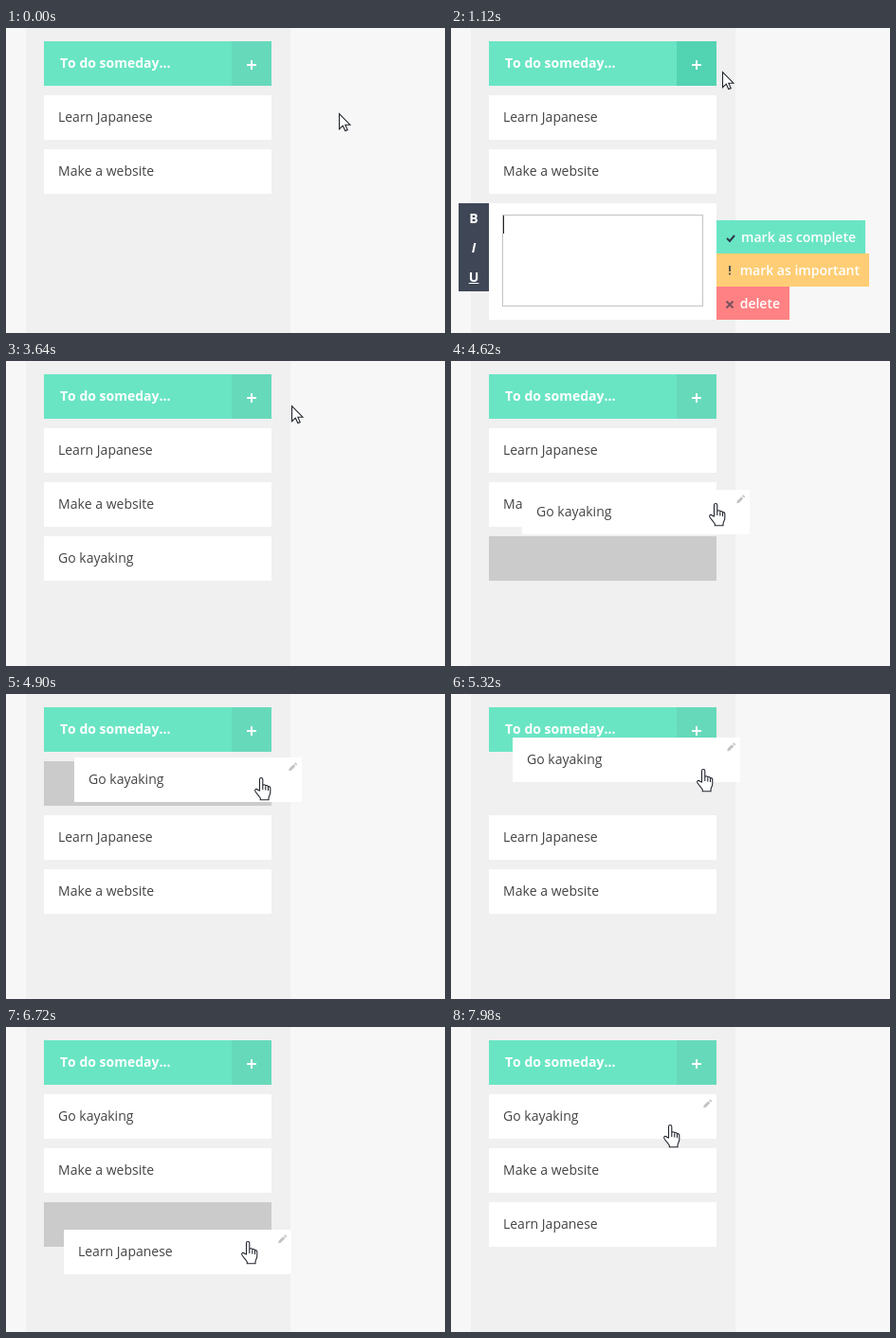
Recreate the animation shown at these times as an HTML page. Size 463 by 322 pixels, loop 8 s.

```html
<!DOCTYPE html>
<html lang="en">
<head>
<meta charset="utf-8">
<title>To-do list</title>
<style>
  html, body { margin: 0; width: 100%; height: 100%; overflow: hidden; }
  body { position: relative; background: #f7f7f7; color: #444; font: 14px/19px "Open Sans", sans-serif; font-kerning: none; cursor: none; }
  div, svg { position: absolute; box-sizing: border-box; }
  svg { overflow: visible; }
  .column { left: 21px; top: 0; width: 279px; height: 322px; background: #f0f0f0; }
  .header, .item, .slot { left: 0; top: 0; width: 240px; height: 47px; white-space: pre; }
  .header { left: 40px; top: 14px; padding: 13px 17px; background: #6ae5c4; color: #fff; font-weight: 700; }
  .add { right: 0; top: 0; width: 42px; height: 47px; background: #67d9bb; }
  .add.hot { background: #52d3b2; }
  .item { padding: 13px 15px; background: #fff; }
  .item.lifted { z-index: 2; }
  .item svg { left: 226px; top: 5px; fill: #c4c4c4; }
  .slot { left: 40px; background: #cbcbcb; }
  .form { left: 40px; top: 185px; width: 240px; height: 123px; background: #fff; }
  .field { left: 14px; top: 12px; width: 212px; height: 97px; border: 1px solid #c3c3c3; }
  .typed { left: 15px; top: 13px; height: 19px; white-space: pre; border-right: 1px solid #222; }
  .tools { left: -32px; top: 0; width: 32px; height: 93px; background: #3f4757; color: #fff;
           font-weight: 700; line-height: 31px; text-align: center; }
  .tools > * { display: block; }
  .action { left: 240px; height: 35px; padding: 8px 10px; color: #fff; font-weight: 600; text-align: right; white-space: pre; }
  .action svg { left: 10px; top: 14px; fill: none; stroke: #2e3b4b; stroke-width: 2; }
  .done { top: 18px; width: 157px; background: #6ae5c4; }
  .urgent { top: 53px; width: 161px; background: #ffcd75; }
  .remove { top: 88px; width: 77px; background: #ff8183; }
  .pointer { left: 0; top: 0; z-index: 3; fill: #fff; stroke: #20242c; stroke-width: 1.1; }
</style>
</head>
<body>
<div class="column"></div>
<div class="header">To do someday...<div class="add"><svg width="42" height="47"><path d="M16 25h10M21 20v10" stroke="#fff" stroke-width="2"/></svg></div></div>
<div class="slot"></div>
<div class="item">Learn Japanese</div>
<div class="item">Make a website</div>
<div class="item">Go kayaking</div>
<div class="form">
  <div class="field"></div>
  <div class="typed"></div>
  <div class="tools"><b>B</b><i>I</i><u>U</u></div>
  <div class="action done"><svg width="10" height="10"><path d="M1 5l3 3 5-6"/></svg>mark as complete</div>
  <div class="action urgent"><svg width="10" height="10"><path d="M4 -1v6M4 6.5v2" opacity=".8"/></svg>mark as important</div>
  <div class="action remove"><svg width="10" height="10"><path d="M.5 1.5l7 7M7.5 1.5l-7 7" opacity=".65"/></svg>delete</div>
</div>
<svg class="pointer" width="20" height="26">
  <path id="arrow" d="M.5 .5V16.7L4.3 13.2L6.8 18.6L9.2 17.6L6.8 12.2H11.9Z"/>
  <path id="hand" transform="translate(-6)" d="M5.5 14V2.2C5.5 0 8.8 0 8.8 2.2V9C9 7.3 11.7 7.3 11.8 9.2C12.2 8 14.4 8.3 14.5 10.2C15 9.2 16.8 9.6 16.8 11.4V16C16.8 18.5 15 20 15 22V23.8H6.3V22C5 20 3 18 .9 14.8C-.2 12.6 2.2 11.6 3.6 13.2ZM8.8 9V13M11.8 9.5V13.5M14.5 10.5V14"/>
</svg>
<script>
const LOOP = 8000, STEP = 70;
const LEFT = 40, TOP = 71, PITCH = 57, SETTLE = 350;
const FORM_OPEN = 1120, FORM_CLOSE = 3010;
const TEXT = "Go kayaking", TYPE_START = 1680, TYPE_SLOW = 2310;

const clamp = (v, lo, hi) => Math.min(hi, Math.max(lo, v));
const mix = (a, b, k) => a + (b - a) * k;
const swing = u => 0.5 - Math.cos(Math.PI * clamp(u, 0, 1)) / 2;
const easeOut = u => Math.sin(Math.PI / 2 * clamp(u, 0, 1));

// Pointer strokes: each bends from the last point towards `via` and ends at `to`
const home = [351, 90];
const strokes = [
  { start: 280, end: 700, via: [300, 58], to: [260, 41], ease: swing },
  { start: 1050, end: 1190, via: [292, 48], to: [300, 46], ease: swing },
  { start: 3615, end: 4130, via: [405, 130], to: [240, 218], ease: swing },
  { start: 4340, end: 5040, via: [301, 177], to: [265, 79], ease: easeOut },
  { start: 5320, end: 5880, via: [250, 118], to: [233, 140], ease: swing },
  { start: 5950, end: 6650, via: [305, 148], to: [254, 226], ease: easeOut },
  { start: 6860, end: 7000, via: [255, 234], to: [256, 242], ease: swing },
  { start: 7420, end: 7980, via: [250, 180], to: [230, 103], ease: swing }
];
const drags = [
  { item: 2, start: 4410, drop: 5320, grip: [200, 33], snap: Math.ceil },
  { item: 0, start: 6020, drop: 6860, grip: [193, 12], snap: Math.floor }
];

const $ = selector => document.querySelector(selector);
const items = [...document.querySelectorAll(".item")];
const [add, slot, form, typed, pointer, arrow, hand] =
  [".add", ".slot", ".form", ".typed", ".pointer", "#arrow", "#hand"].map($);
items.forEach(el => el.insertAdjacentHTML("beforeend",
  '<svg width="10" height="10"><path d="M.2 9.3L.8 6.6L5.2 2.2L7.3 4.3L2.9 8.7ZM6 1.4L7.2 .2L9.3 2.3L8.1 3.5Z"/></svg>'));

const rowY = row => TOP + PITCH * row;
const show = (el, on) => { el.style.visibility = on ? "visible" : "hidden"; };
const move = (el, x, y) => { el.style.transform = `translate(${Math.round(x)}px, ${Math.round(y)}px)`; };
const inside = ([px, py], x, y, w, h) => px >= x && px < x + w && py >= y && py < y + h;
const onAdd = point => inside(point, 238, 14, 42, 47);

function pointerAt(t) {
  return strokes.filter(s => s.start <= t).reduce((from, { start, end, via, to, ease }) => {
    const k = ease((t - start) / (end - start));
    return from.map((v, i) => mix(mix(v, via[i], k), mix(via[i], to[i], k), k));
  }, home);
}

function layout(t) {
  let order = [0, 1, 2], lifted = null;
  for (const { item, start, drop, grip, snap } of drags) {
    if (t < start) break;
    // A held item trails the pointer by one step
    const p = pointerAt(Math.min(t, drop) - STEP);
    const x = p[0] - grip[0], y = p[1] - grip[1];
    const row = clamp(snap((y - TOP) / PITCH), 0, 2);
    order = order.filter(i => i !== item);
    order.splice(row, 0, item);
    const k = swing((t - drop) / SETTLE);
    lifted = k < 1 ? { item, row, held: t < drop, x: mix(x, LEFT, k), y: mix(y, rowY(row), k) } : null;
  }
  return { order, lifted };
}

function typedCount(t) {
  const keys = Math.min((t - TYPE_START) / 105, 6 + (t - TYPE_SLOW) / 140);
  return clamp(Math.floor(keys) + 1, 0, TEXT.length);
}

function draw(t) {
  const tip = pointerAt(t), { order, lifted } = layout(t);
  const held = lifted && lifted.held;
  let pointing = onAdd(tip);

  items.forEach((el, i) => {
    const active = lifted && lifted.item === i;
    const x = active ? lifted.x : LEFT;
    const y = active ? lifted.y : rowY(order.indexOf(i));
    const visible = i !== 2 || t >= FORM_CLOSE;
    const hovered = visible && (held ? active : inside(tip, x, y, 240, 47));
    pointing = pointing || hovered;
    move(el, x, y);
    show(el, visible);
    show(el.lastElementChild, hovered);
    el.classList.toggle("lifted", !!active);
  });

  show(slot, held);
  if (held) move(slot, 0, rowY(lifted.row));

  add.classList.toggle("hot", onAdd(pointerAt(t - STEP)));
  show(form, t >= FORM_OPEN && t < FORM_CLOSE);
  typed.textContent = TEXT.slice(0, typedCount(t));
  typed.style.borderColor = t >= TYPE_START - STEP && t < TYPE_START ? "transparent" : "";

  move(pointer, ...tip);
  show(arrow, !pointing);
  show(hand, pointing);
}

function frame() {
  const t = performance.now() % LOOP;
  draw(Math.floor(t / STEP) * STEP);
  requestAnimationFrame(frame);
}
frame();
</script>
</body>
</html>
```
